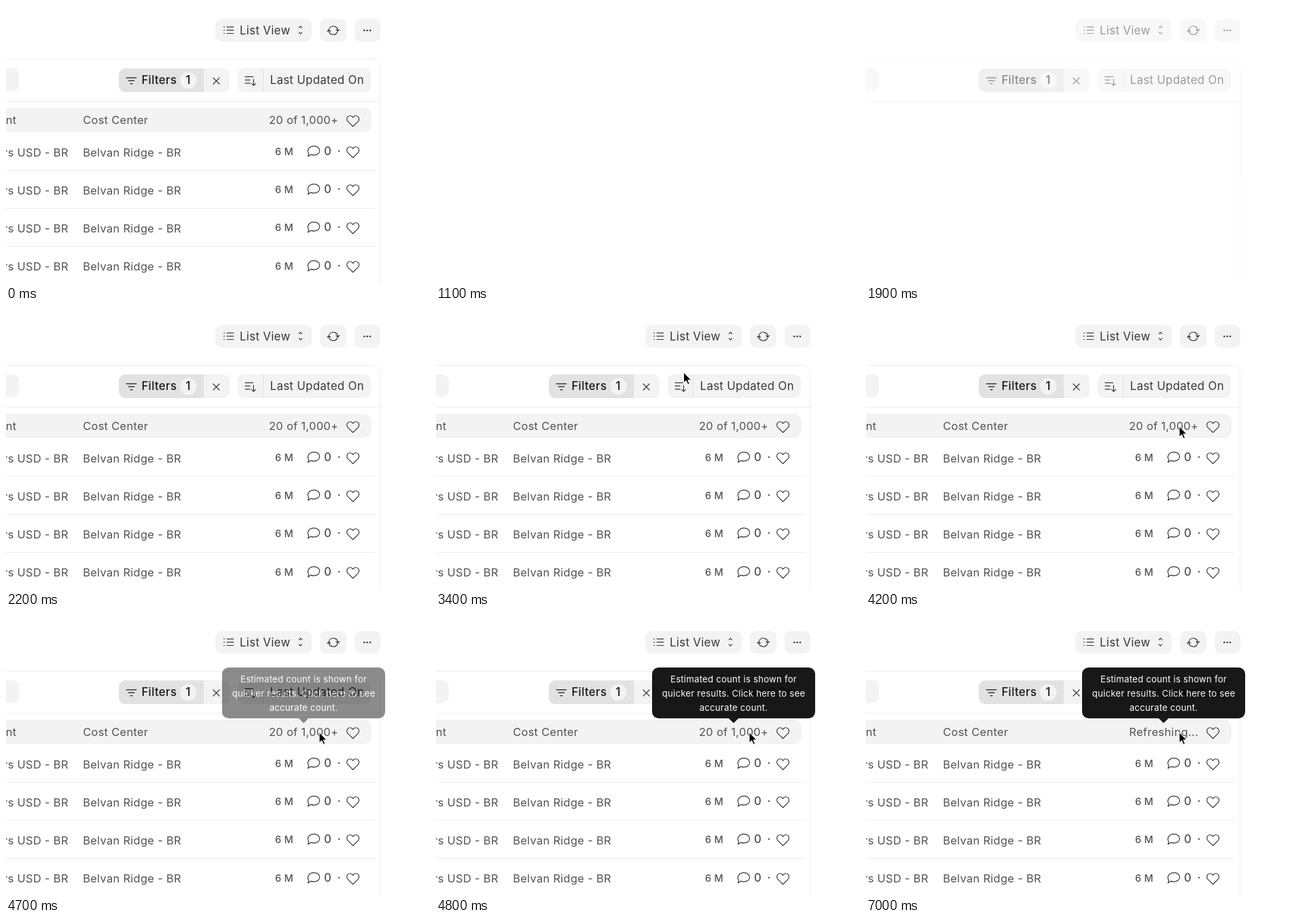
Animation of 624 by 410 pixels, one loop 8 s. Source, as an HTML page:

```html
<!DOCTYPE html>
<html lang="en">
<head>
<meta charset="utf-8">
<title>List view</title>
<style>
  html, body { margin: 0; width: 100%; height: 100%; overflow: hidden; background: #fff; }
  svg { display: block; width: 624px; height: 410px; }
  text { font: 400 16.4px Inter, sans-serif; letter-spacing: .02em; fill: #525252; font-optical-sizing: none; }
  .btn { fill: #f3f3f3; }
  .label { font-size: 16.8px; font-weight: 420; fill: #383838; }
  .strong { font-weight: 450; fill: #171717; }
  .badge { font-weight: 500; }
  .age { font-size: 14.4px; font-weight: 500; }
  .num { font-size: 16.8px; font-weight: 450; }
  .icon { fill: none; stroke: #383838; stroke-width: 1.2; stroke-linecap: round; stroke-linejoin: round; }
  .rule { fill: none; stroke: #ededed; }
  .end { text-anchor: end; }
  .mid { text-anchor: middle; }
  .tip text { font-size: 13.2px; letter-spacing: .016em; fill: #fff; text-anchor: middle; }
</style>
</head>
<body>
<svg viewBox="0 0 624 410">
  <defs>
    <path id="heart" class="icon" d="M0 8.7 L-7.4 1.4 C-9.4 -.7 -9.4 -4 -7.5 -5.9 C-5.5 -7.8 -2.3 -7.7 -.6 -5.4 L0 -4.6 L.6 -5.4 C2.3 -7.7 5.5 -7.8 7.5 -5.9 C9.4 -4 9.4 -.7 7.4 1.4 Z"/>
    <path id="bubble" class="icon" d="M-8.2 7.6 L-6.9 3.9 C-10.6 -1.4 -6.4 -7.6 .6 -7.6 C5.6 -7.6 9 -4.8 9 -1 C9 2.9 5.6 5.7 .6 5.7 C-1 5.7 -2.3 5.4 -3.6 4.9 Z"/>
  </defs>

  <g id="shell">
    <rect class="btn" x="308" y="19" width="142" height="33.5" rx="9.6"/>
    <rect class="btn" x="462" y="19" width="39" height="33.5" rx="9.6"/>
    <rect class="btn" x="513" y="19" width="38" height="33.5" rx="9.6"/>
    <path class="icon" d="M325.2 30.9h9.6M325.2 35.7h9.6M325.2 40.5h9.6M320.6 30.9h.8M320.6 35.7h.8M320.6 40.5h.8"/>
    <text class="label" x="344" y="42">List View</text>
    <path class="icon" d="M431.2 32.2l2.2 -2.2l2.2 2.2M431.2 38.9l2.2 2.2l2.2 -2.2"/>
    <path class="icon" d="M475.8 33.4A6.7 6.7 0 0 1 488.4 37M485.8 34.8l2.6 2.4l2.2 -2.6M487.6 38.6A6.7 6.7 0 0 1 475 35M472.8 37.4l2.2 -2.6l2.6 2.4"/>
    <g fill="#383838"><circle cx="527.3" cy="36" r="1.3"/><circle cx="531.6" cy="36" r="1.3"/><circle cx="535.9" cy="36" r="1.3"/></g>

    <path class="rule" d="M0 78.5H538.5a12 12 0 0 1 12 12V410M0 140.5H550"/>
    <rect class="btn" x="-30" y="92" width="49" height="33.5" rx="9.6"/>
    <rect class="btn" x="270" y="92" width="59" height="35" rx="9.6"/>
    <path fill="#e2e2e2" d="M291 92H175.6a9.6 9.6 0 0 0 -9.6 9.6v15.8a9.6 9.6 0 0 0 9.6 9.6H291Z"/>
    <path class="icon" style="stroke:#171717" d="M177.2 105.8h14.6M180.3 110.2h8.5M183.2 114.6h2.8"/>
    <text class="label strong" x="199.4" y="115.4">Filters</text>
    <rect class="btn" x="256" y="97.5" width="24.5" height="24.5" rx="12.2"/>
    <text class="label strong badge mid" x="268.2" y="115.4">1</text>
    <path class="icon" d="M305 106l9 9M314 106l-9 9"/>

    <rect class="btn" x="341" y="92" width="196" height="35" rx="9.6"/>
    <path id="sort" fill="#e7e7e7" d="M378 92H350.6a9.6 9.6 0 0 0 -9.6 9.6v15.8a9.6 9.6 0 0 0 9.6 9.6H378Z"/>
    <path stroke="#e2e2e2" d="M378.5 92V127"/>
    <path class="icon" d="M352 104.4h11.5M352 109.1h7.2M352 113.8h7.2M364.4 108v9.3M361.4 114.4l3 3l3 -3"/>
    <text class="label" x="388.6" y="115.4">Last Updated On</text>
  </g>

  <g id="list">
    <rect class="btn" x="-20" y="150" width="558" height="36" rx="12"/>
    <text class="end" x="15.4" y="174.4">Account</text>
    <text x="113.2" y="174.4">Cost Center</text>
    <text class="end" id="count" x="489.2" y="174.4"></text>
    <use href="#heart" x="510.6" y="169"/>
  </g>

  <g id="tip" class="tip">
    <path d="M327.6 73H548.4a9.6 9.6 0 0 1 9.6 9.6V138.4a9.6 9.6 0 0 1 -9.6 9.6H445.2L438 155L430.8 148H327.6a9.6 9.6 0 0 1 -9.6 -9.6V82.6a9.6 9.6 0 0 1 9.6 -9.6Z"/>
    <text x="438" y="94.6">Estimated count is shown for</text>
    <text x="438" y="116">quicker results. Click here to see</text>
    <text x="438" y="137.4">accurate count.</text>
  </g>

  <path id="cursor" stroke="#fff" stroke-width="1" d="M0 0V15.6L3.6 12.3L6.2 18L8.6 16.9L6.1 11.4H11Z"/>
</svg>
<script>
const LOOP = 8000, STEP = 100;
const $ = id => document.getElementById(id);

const row = i => `<g transform="translate(0 ${i * 56})">
  <text x="-14" y="222">ors USD - BR</text>
  <text x="113.2" y="222">Belvan Ridge - BR</text>
  ${i < 3 ? '<path class="rule" d="M0 242.5H544"/>' : ''}
</g>
<g transform="translate(0 ${Math.round(i * 56.2)})">
  <text class="age" x="396" y="220">6 M</text>
  <use href="#bubble" x="452.6" y="214.2"/>
  <text class="num" x="468" y="220.2">0</text>
  <circle cx="490" cy="214" r="1.2" fill="#525252"/>
  <use href="#heart" x="510.6" y="215"/>
</g>`;
$('list').insertAdjacentHTML('beforeend', [0, 1, 2, 3].map(row).join(''));

// Pointer travels along a quadratic curve with smooth start and stop.
const bend = (a, b, c, p) => (1 - p) ** 2 * a + 2 * p * (1 - p) * b + p * p * c;
function pointer(t) {
  const p = Math.min(1, Math.max(0, (t - 3600) / 600));
  const e = p * p * (3 - 2 * p);
  return [bend(364.5, 372, 461, e), bend(89, 130, 168.5, e)];
}

function draw(time) {
  const t = Math.floor(time / STEP) * STEP;
  const blank = t >= 1100 && t < 1900;
  const [x, y] = pointer(t);
  const hover = t >= 3400 && x >= 341 && x < 378 && y >= 92 && y < 127;

  $('shell').style.opacity = blank ? 0 : t === 1900 ? .5 : 1;
  $('list').style.opacity = t < 1100 || t >= 2200 ? 1 : 0;
  $('sort').style.opacity = hover ? 1 : 0;
  $('tip').style.opacity = t < 4700 ? 0 : t < 4800 ? .45 : .9;
  $('cursor').style.opacity = t < 3400 ? 0 : 1;
  $('cursor').setAttribute('transform', `translate(${x} ${y})`);
  $('count').textContent = t < 7000 ? '20 of 1,000+' : 'Refreshing...';
}

const start = performance.now();
function tick() {
  draw((performance.now() - start) % LOOP);
  requestAnimationFrame(tick);
}
tick();
</script>
</body>
</html>
```
